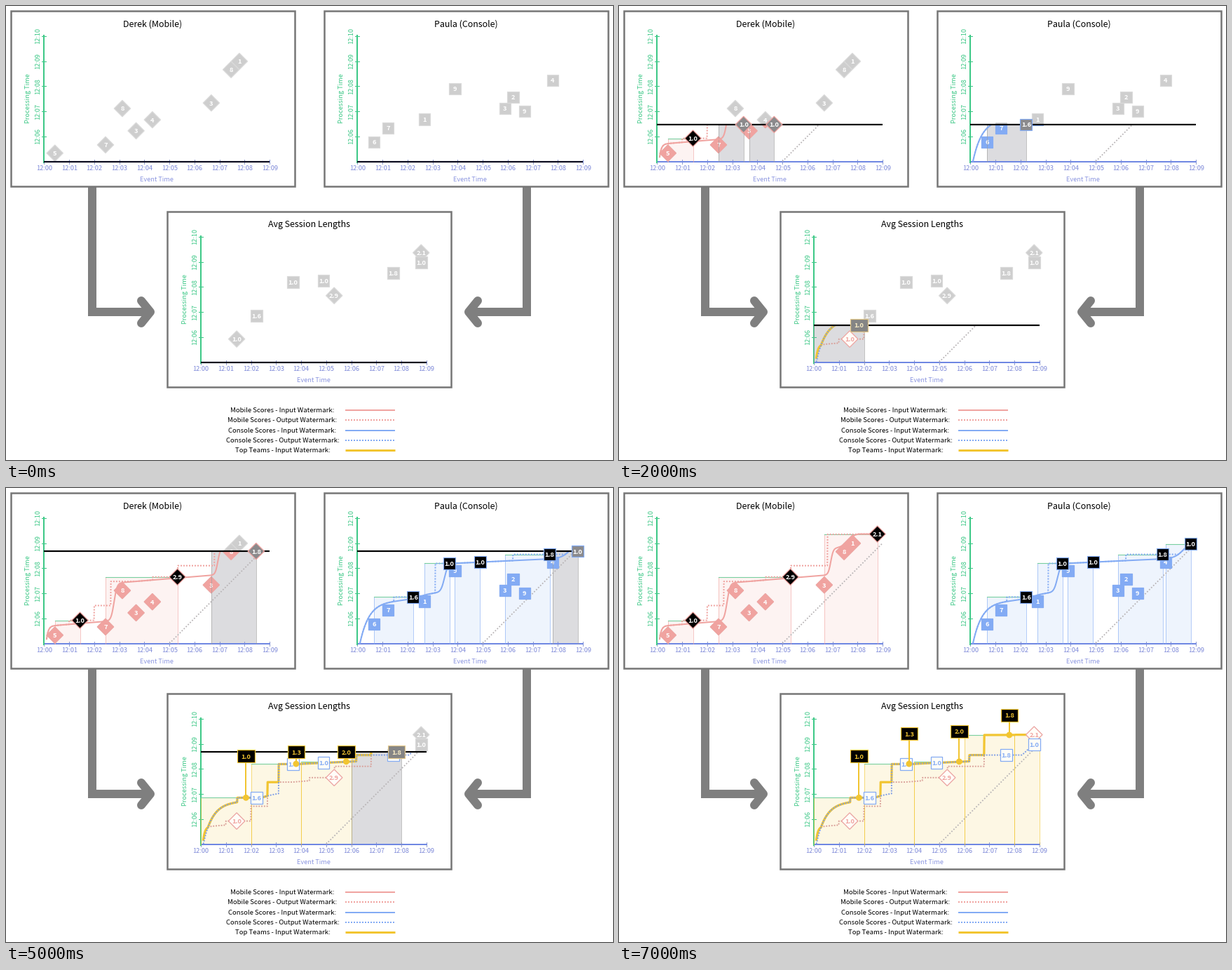
Recreate the animation shown at these times as a matplotlib script. Size 866x647 px, loop 8 s.

```python
import numpy as np
import matplotlib.pyplot as plt
from matplotlib.animation import FuncAnimation
from matplotlib.patches import Circle, Polygon, Rectangle

W, H, DPI = 866, 647, 64
PT = 72 / DPI          # points per pixel
U = 35.75              # pixels per minute
STEPS, PACE = 8, 0.735  # steps per loop, processing minutes per step
FONT = "Noto Sans CJK JP"

GREY, GHOST, SHADE = "#767676", "#cecece", "#dcdcdf"
GREEN, AXIS, LABEL = "#3cc886", "#6f87e2", "#7f8ad9"
PINK, BLUE, GOLD = "#f0a3a0", "#83abf4", "#f2c531"
DOTS = (0, (1, 1))

# Panel origins: where the axes cross
MOBILE, CONSOLE, TEAMS = (54.4, 221.5), (501.4, 221.5), (278, 507.5)

# Scores: event minute, processing minute past 12:05, value
MOBILE_EVENTS = [(0.43, 0.33, 5), (2.45, 0.66, 7), (3.67, 1.22, 3), (4.32, 1.66, 4),
                 (3.12, 2.11, 8), (6.67, 2.33, 3), (7.46, 3.66, 8), (7.79, 3.99, 1)]
CONSOLE_EVENTS = [(0.66, 0.77, 6), (1.22, 1.33, 7), (2.67, 1.68, 1), (5.89, 2.11, 3),
                  (6.67, 2.00, 9), (6.22, 2.56, 2), (3.89, 2.90, 9), (7.79, 3.23, 4)]
BOX_REST = [3.5, 4.4, 4.5, 5.19]  # where each team result stops


# Watermarks: processing minute as a function of event minute
def ease(e, at, height, width):
    return height * (1 + np.tanh((e - at) / width)) / 2


def mobile_in(e):
    p = 0.68 * (1 - np.exp((0.08 - e) / 0.07)) + 0.08 * e
    p = p + ease(e, 2.79, 1.5, 0.12) + ease(e, 6.93, 1.05, 0.1) + ease(e, 7.6, 0.5, 0.25)
    return np.minimum(p, 4.36)


def console_in(e):
    p = 1.64 * (1 - np.exp((0.1 - e) / 0.36)) + 0.045 * e
    return p + ease(e, 2.5, 0.25, 0.5) + ease(e, 3.47, 1.13, 0.14) + ease(e, 8.5, 0.66, 0.35)


def hold(p, e, jumps):
    """Raise p to each level once its event minute has passed."""
    for at, level in jumps:
        p = np.where(e >= at, np.maximum(p, level), p)
    return p


def mobile_out(e):
    return hold(mobile_in(e), e, [(1, 0.92), (2, 1.51), (2.66, 2.47), (4.33, 2.65),
                                  (5.33, 3.1), (6.8, 4.35)])


def console_out(e):
    return hold(console_in(e), e, [(1.45, 1.85), (3.1, 3.19), (6.2, 3.55)])


def teams_in(e):
    return np.maximum(mobile_out(e), console_out(e))


fig = plt.figure(figsize=(W / DPI, H / DPI), dpi=DPI, facecolor="white")
ax = fig.add_axes([0, 0, 1, 1])


def place(org, e, p):
    return org[0] + U * e, org[1] - U * p


def line(xs, ys, color, lw, z=2, clip=None, ls="-", **kw):
    art, = ax.plot(xs, ys, color=color, lw=lw * PT, ls=ls, zorder=z, **kw)
    if clip:
        art.set_clip_path(clip)


def patch(shape, z, clip=None):
    shape.set_zorder(z)
    ax.add_patch(shape)
    if clip:
        shape.set_clip_path(clip)


def text(x, y, s, size, color="black", z=2, clip=None, **kw):
    art = ax.text(x, y, s, fontsize=size * PT, color=color, family=FONT, ha="center", zorder=z, **kw)
    if clip:
        art.set_clip_path(clip)
        art.set_clip_on(True)


def marker(kind, xy, label, fill, edge, ink, z, clip=None):
    """A labelled diamond, square or wide box centred on xy."""
    x, y = xy
    if kind == "diamond":
        r = 11.7
        pts = [(x - r, y), (x, y - r), (x + r, y), (x, y + r)]
    else:
        w, h = (12.3, 9) if kind == "box" else (8.3, 8.3)
        pts = [(x - w, y - h), (x + w, y - h), (x + w, y + h), (x - w, y + h)]
    patch(Polygon(pts, fc=fill, ec=edge, lw=1.2 * PT), z, clip)
    text(x, y + 3.4, label, 9.3, ink, z + 0.01, clip, weight="bold")


def ghost(kind, xy, label):
    marker(kind, xy, label, GHOST, "#dadada", "white", 3)


def sessions(events, p):
    """Merge one-minute spans of the events that have arrived by p."""
    spans = []
    for e in sorted(e for e, t, _ in events if t <= p):
        if spans and e <= spans[-1][1]:
            spans[-1][1] = e + 1
        else:
            spans.append([e, e + 1])
    return spans


def results(events, out, kind, color):
    """Finished sessions: event minute, processing minute, length and look."""
    return [(b, float(out(b)), round(b - a, 1), kind, color) for a, b in sessions(events, 99)]


RESULTS = (results(MOBILE_EVENTS, mobile_out, "diamond", PINK)
           + results(CONSOLE_EVENTS, console_out, "square", BLUE))


def span(org, a, b, top, color, done):
    """Shaded window from event minute a to b, with a green lid once closed."""
    x, y = place(org, a, top)
    w, h = U * (b - a), U * top
    patch(Rectangle((x, y), w, h, fc=color if done else SHADE, alpha=0.13 if done else 1, lw=0), 1)
    for ex in (x, x + w):
        line([ex, ex], [y, y + h], color if done else "#9c9c9c", 1, 2.5 if done else 4.5, alpha=0.6)
    if done:
        line([x, x + w], [y, y], "#78cf9f", 1.1, 2.6)


def curve(org, rule, color, lw, clip, ls="-", z=5):
    e = np.linspace(0.1, 9, 900)
    line(*place(org, e, rule(e)), color, lw, z, clip, ls)


def frame(org, title):
    x, y = org
    patch(Rectangle((x - 47.6, y - 215), 405, 250.8, fc="white", ec=GREY, lw=2.5 * PT), 0.5)
    text(x + 155, y - 192, title, 12.4)
    text(x + 161, y + 28, "Event Time", 9.1, "#8c96e0")
    text(x - 23, y - 89.5, "Processing Time", 9.2, GREEN, rotation=90, va="center")
    line([x, x + 9 * U], [y, y], AXIS, 2, 2)
    line([x, x], [y + 1, y - 5 * U - 1], GREEN, 2, 2.1)
    for m in range(10):
        tx = x + m * U
        line([tx, tx], [y - 3, y + 3.5], "#8f99cf", 1, 1.9)
        text(tx, y + 12.3, f"12:{m:02d}", 9.2, LABEL)
    for m in range(1, 6):
        ty = y - m * U
        line([x - 3, x + 3], [ty, ty], GREEN, 1, 2)
        text(x - 8.5, ty, f"12:{m + 5:02d}", 9.2, GREEN, rotation=90, va="center")


def arrows():
    for side in (1, -1):
        def fx(*xs):
            return [433 + side * (x - 433) for x in xs]
        line(fx(123, 123, 204), [258, 436, 436], "#7f7f7f", 12, 0.4,
             solid_joinstyle="miter", solid_capstyle="butt")
        line(fx(193, 206, 193), [420, 436, 452], "#7f7f7f", 12, 0.4,
             solid_joinstyle="round", solid_capstyle="round")


def legend():
    rows = [("Mobile Scores - Input", PINK, 2, "-"), ("Mobile Scores - Output", PINK, 2, DOTS),
            ("Console Scores - Input", BLUE, 2, "-"), ("Console Scores - Output", BLUE, 2, DOTS),
            ("Top Teams - Input", GOLD, 3, "-")]
    for k, (name, color, lw, ls) in enumerate(rows):
        y = 576 + 14.25 * k
        text(394.5, y + 3, name + " Watermark:", 9.6)
        line([484, 555], [y, y], color, lw, ls=ls, solid_capstyle="butt")


def clock(org, p):
    """Draw the processing-time line and return the clip area below it."""
    x, y = place(org, 0, p)
    if p <= 5:
        line([x, x + 9 * U], [y, y], "#0b0b1e" if p == 0 else "black", 2.2, 6, solid_capstyle="butt")
    clip = Rectangle((0, H), W, y - H, transform=ax.transData)
    ideal = np.array([0, 4])
    line(*place(org, ideal + 5, ideal), "#b9b5b7", 1.8, 2.8, clip, (0, (1, 1.3)))
    return clip


def player(org, title, events, kind, color, wm_in, wm_out, p):
    frame(org, title)
    clip = clock(org, p)
    for e, t, v in events:
        xy = place(org, e, t)
        ghost(kind, xy, str(v))
        marker(kind, xy, str(v), color, color, "white", 4, clip)
    curve(org, wm_in, color, 2, clip)
    curve(org, wm_out, color, 2, clip, DOTS)
    for a, b in sessions(events, p):
        close = float(wm_out(b))
        done = p >= close
        top = min(p, close)
        span(org, a, b, top, color, done)
        marker(kind, place(org, b, top), f"{b - a:.1f}", "black" if done else "#8b8a8c",
               color, "white", 7)


def teams(p):
    org = TEAMS
    frame(org, "Avg Session Lengths")
    clip = clock(org, p)
    for e, t, v, kind, color in RESULTS:
        xy = place(org, e, t)
        ghost(kind, xy, f"{v:.1f}")
        marker(kind, xy, f"{v:.1f}", "#fffdf8", color, color, 5.3, clip)
    curve(org, teams_in, GOLD, 3.2, clip)
    curve(org, mobile_out, "#d99f98", 1.9, clip, DOTS, 4.8)
    curve(org, console_out, "#7b9be6", 1.9, clip, DOTS, 5.1)

    for k in range(5):
        start, end = 2 * k, min(2 * k + 2, 9)
        close = float(teams_in(end))
        done = p >= close
        vals = [v for e, t, v, *_ in RESULTS if start <= e < end and t <= p]
        if not vals:
            continue
        span(org, start, end, min(p, close), GOLD, done)
        if k < len(BOX_REST):
            spot = place(org, start + 1.8, min(p, BOX_REST[k]))
            if done:
                x, y = place(org, start + 1.8, close)
                line([x, x], [y, spot[1]], GOLD, 2, 6.5)
                patch(Circle((x, y), 4.4, fc=GOLD, lw=0), 6.6)
            # the nudge rounds halves up
            marker("box", spot, f"{np.mean(vals) + 1e-6:.1f}", "black" if done else "#858585",
                   GOLD if done else "#e3c88a", GOLD if done else "#fbeec5", 7)


def update(i):
    ax.cla()
    ax.set_xlim(0, W)
    ax.set_ylim(H, 0)
    ax.axis("off")
    p = PACE * i
    arrows()
    legend()
    player(MOBILE, "Derek (Mobile)", MOBILE_EVENTS, "diamond", PINK, mobile_in, mobile_out, p)
    player(CONSOLE, "Paula (Console)", CONSOLE_EVENTS, "square", BLUE, console_in, console_out, p)
    teams(p)
    return []


anim = FuncAnimation(fig, update, frames=STEPS, interval=1000, repeat=True,
                     repeat_delay=0, init_func=lambda: [])
plt.show()
```
